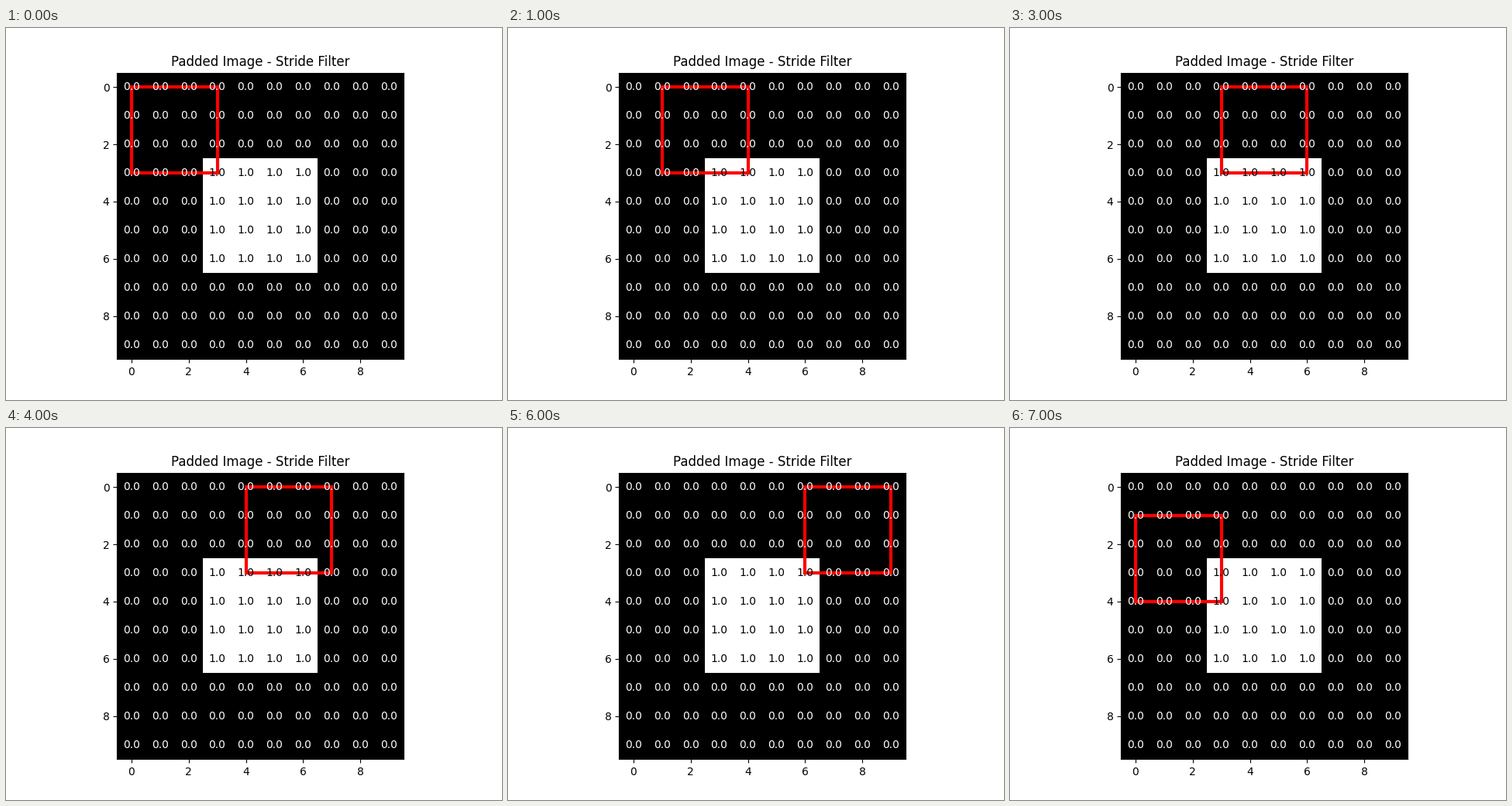
Write a matplotlib script that moves like this. It is 640 by 480 pixels and loops after 8 s.

```python
import numpy as np
import matplotlib.pyplot as plt
from matplotlib.animation import FuncAnimation
from matplotlib.patches import Rectangle

SIZE = 10      # padded image side
KERNEL = 3     # filter side
STEPS = SIZE - KERNEL

image = np.zeros((SIZE, SIZE))
image[3:7, 3:7] = 1

fig, ax = plt.subplots(figsize=(6.4, 4.8), dpi=100)
ax.imshow(image, cmap="gray")
ax.set_title("Padded Image - Stride Filter")

for (row, col), value in np.ndenumerate(image):
    ax.text(col, row, f"{value:.1f}", ha="center", va="center",
            color="black" if value else "white")

window = Rectangle((0, 0), KERNEL, KERNEL, linewidth=3,
                   edgecolor="red", facecolor="none")
ax.add_patch(window)


def update(frame):
    """Slide the filter along a row, then drop to the next one."""
    row, col = divmod(frame, STEPS)
    window.set_xy((col, row))
    return (window,)


anim = FuncAnimation(fig, update, frames=8, interval=1000,
                     repeat=True, repeat_delay=0)
plt.show()
```
